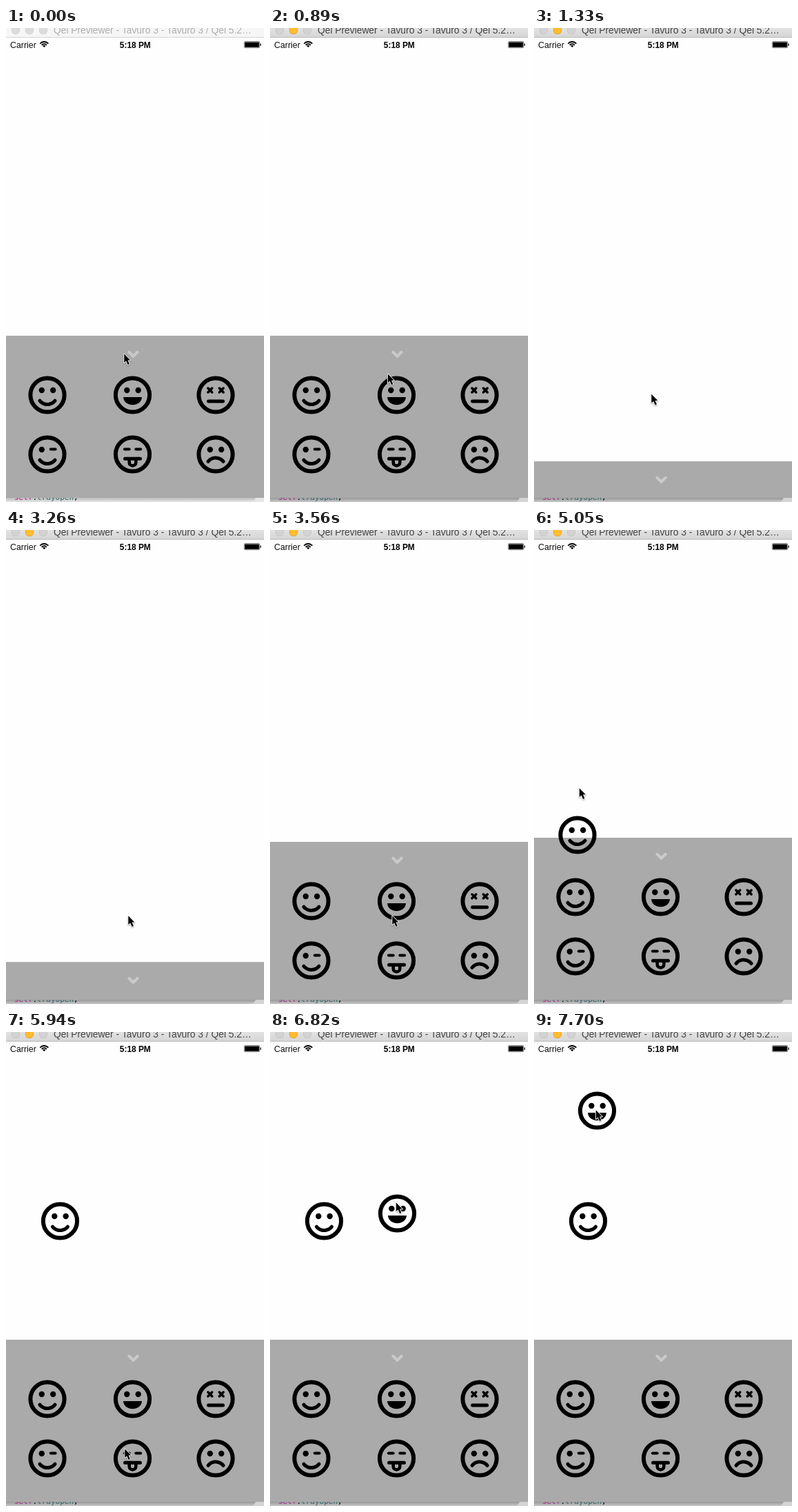
An HTML page with a canvas for the animation above (8000 ms loop, 374x687 px).

```html
<!DOCTYPE html>
<html lang="en">
<head>
<meta charset="utf-8">
<title>Face tray</title>
<style>
  html, body { margin: 0; width: 100%; height: 100%; overflow: hidden; background: #fff; }
  canvas { display: block; width: 374px; height: 687px; }
</style>
</head>
<body>
<canvas id="stage"></canvas>
<script>
const W = 374, H = 687, LOOP = 8000, STEPS = 54;
const FLOOR = 681, OPEN = 446, CLOSED = 628;
const SANS = '"Liberation Sans", Arial, sans-serif';
const canvas = document.getElementById('stage');
const ctx = canvas.getContext('2d');
const dpr = window.devicePixelRatio || 1;
canvas.width = W * dpr;
canvas.height = H * dpr;

const smooth = k => k * k * (3 - 2 * k);
const leg = (from, to, x, y) => ({ from, to, x, y });

function travel(x, y, legs, n) {
  for (const l of legs) {
    const k = smooth(Math.min(1, Math.max(0, (n - l.from) / (l.to - l.from))));
    x += (l.x - x) * k;
    y += (l.y - y) * k;
  }
  return [x, y];
}

// Damped spring from 0 to 1
function spring(s) {
  const damp = 1.6;
  return s <= 0 ? 0 : 1 - Math.exp(-damp * s) * (Math.cos(s) + damp * Math.sin(s));
}

const trayTop = n => OPEN + (CLOSED - OPEN) * (spring(n - 6.4) - spring(n - 21.92));

const pointer = [
  leg(5, 7, 170, 530.5), leg(11, 15, 177, 650), leg(20, 22, 177, 559),
  leg(27, 31, 61, 538), leg(33, 34, 65.5, 374), leg(34, 36, 79, 280),
  leg(37, 40, 172, 604), leg(40, 43, 181, 533),
  leg(44, 46, 182.5, 247), leg(46, 52, 89.5, 113)
];
const columns = [60, 183.5, 304];
const kinds = ['happy', 'excited', 'dead', 'wink', 'tongue', 'sad'];
const copies = [
  { kind: 'happy', x: columns[0], legs: [leg(33, 34, 63, 442), leg(34, 36, 78.5, 274)] },
  { kind: 'excited', x: columns[1], legs: [leg(44.5, 46, 184.5, 263), leg(46, 52, 91.5, 114)] }
];

// Drawing helpers
function rect(x, y, w, h, color) {
  ctx.fillStyle = color;
  ctx.fillRect(x, y, w, h);
}

function disc(x, y, r, color) {
  ctx.fillStyle = color;
  ctx.beginPath();
  ctx.arc(x, y, r, 0, Math.PI * 2);
  ctx.fill();
}

function arc(x, y, r, mid, half, width) {
  ctx.lineWidth = width;
  ctx.beginPath();
  ctx.arc(x, y, r, mid - half, mid + half);
  ctx.stroke();
}

function line(width, ...pts) {
  ctx.lineWidth = width;
  ctx.beginPath();
  pts.forEach(([x, y]) => ctx.lineTo(x, y));
  ctx.stroke();
}

function label(str, x, y, font, color, align = 'left') {
  ctx.font = font;
  ctx.fillStyle = color;
  ctx.textAlign = align;
  ctx.fillText(str, x, y);
}

function vertical(y0, y1, c0, c1) {
  const g = ctx.createLinearGradient(0, y0, 0, y1);
  g.addColorStop(0, c0);
  g.addColorStop(1, c1);
  return g;
}

// Face parts, around the centre of the face
const EYE_X = 8.2, EYE_Y = -7, BOW = 14.1;
const dot = side => disc(side * EYE_X, EYE_Y, 4.2, '#000');
const dash = side => line(4, [side * EYE_X - 3.4, EYE_Y - 0.4], [side * EYE_X + 3.4, EYE_Y - 0.4]);
function cross(side) {
  const x = side * EYE_X, r = 2.9;
  for (const d of [-r, r]) line(3.6, [x - r, EYE_Y - d], [x + r, EYE_Y + d]);
}
const smile = () => arc(0, 13.5 - BOW, BOW, Math.PI / 2, 0.9, 5);
const frown = () => arc(0, 5 + BOW, BOW, -Math.PI / 2, 0.9, 5);
const flat = () => line(5, [-10.5, 8.9], [10.5, 8.9]);
function laugh() {
  ctx.beginPath();
  ctx.moveTo(-13.5, 3.1);
  ctx.lineTo(13.5, 3.1);
  ctx.bezierCurveTo(12.5, 18, -12.5, 18, -13.5, 3.1);
  ctx.fill();
}
function lick() {
  line(5, [-11, 6.2], [11, 6.2]);
  ctx.lineWidth = 4.6;
  ctx.beginPath();
  ctx.moveTo(-4.8, 7);
  ctx.lineTo(-4.8, 11.5);
  ctx.bezierCurveTo(-4.8, 18, 4.8, 18, 4.8, 11.5);
  ctx.lineTo(4.8, 7);
  ctx.stroke();
}

const faces = {
  happy: [dot, dot, smile],
  excited: [dot, dot, laugh],
  dead: [cross, cross, flat],
  wink: [dot, dash, smile],
  tongue: [dash, dash, lick],
  sad: [dot, dot, frown]
};

function face(kind, x, y) {
  const [left, right, mouth] = faces[kind];
  ctx.save();
  ctx.translate(x, y);
  ctx.strokeStyle = ctx.fillStyle = '#000';
  ctx.lineCap = 'round';
  arc(0, 0, 24.6, 0, Math.PI, 6);
  left(-1);
  right(1);
  mouth();
  ctx.restore();
}

// Scene
function titleBar(active) {
  rect(0, 0, W, 13, active ? vertical(0, 13, '#e2e2e2', '#d6d6d6') : '#f6f6f6');
  rect(0, 13, W, 1, active ? '#b8b8b8' : '#d4d4d4');
  for (let i = 0; i < 3; i++) {
    const lit = active && i === 1, x = 14 + 20 * i;
    disc(x, 3, 6.3, lit ? '#e0a02c' : active ? '#c2c2c2' : '#d2d2d2');
    disc(x, 3, 5.6, lit ? '#fdbd2f' : active ? '#d3d3d3' : '#dcdcdc');
  }
  label('Qel Previewer - Tavuro 3 - Tavuro 3 / Qel 5.2…', 69, 8,
    '13.8px ' + SANS, active ? '#444' : '#aeaeae');
}

function statusBar() {
  label('Carrier', 6, 28.5, '12.4px ' + SANS, '#111');
  label('5:18 PM', 187.3, 28.5, 'bold 11.9px ' + SANS, '#000', 'center');
  ctx.strokeStyle = '#000';
  ctx.lineCap = 'butt';
  for (const r of [8, 4.8, 1.5]) arc(55.3, 28, r, -Math.PI / 2, 0.85, r > 2 ? 1.8 : 3);
  ctx.lineWidth = 0.5;
  ctx.beginPath();
  ctx.roundRect(345.3, 19.5, 22.4, 9.2, 1.5);
  ctx.stroke();
  rect(346.2, 20.5, 20.6, 7.3, '#000');
  rect(368.4, 22.5, 1.2, 3.4, '#000');
}

function codeStrip(active) {
  rect(0, FLOOR, W, H - FLOOR, active ? '#d4d4d4' : '#e6e6e6');
  ctx.fillStyle = active ? vertical(FLOOR, H, '#989898', '#c8c8c8') : vertical(FLOOR, H, '#bcbcbc', '#e6e6e6');
  ctx.beginPath();
  ctx.roundRect(0, FLOOR - 10, 362, 16, [0, 0, 8, 0]);
  ctx.fill();
  let x = 12;
  for (const [word, color] of [['self', '#b01a98'], ['.', '#000'], ['trayopen', '#35666c'], [';', '#000']]) {
    label(word, x, 684.3, '11px "DejaVu Sans Mono", monospace', color);
    x += ctx.measureText(word).width;
  }
}

function tray(top) {
  ctx.save();
  ctx.beginPath();
  ctx.rect(0, top, W, FLOOR - top);
  ctx.clip();
  rect(0, top, W, FLOOR - top, '#aaa');
  ctx.strokeStyle = '#cacaca';
  ctx.lineCap = 'butt';
  line(4, [177.2, top + 22.6], [184.5, top + 29.7], [191.8, top + 22.6]);
  kinds.forEach((kind, i) => face(kind, columns[i % 3], top + (i < 3 ? 86 : 172)));
  ctx.restore();
}

function cursor(x, y) {
  ctx.save();
  ctx.translate(x, y);
  ctx.beginPath();
  [[0.3, 0.3], [0.3, 13], [3.2, 10.4], [5.6, 16], [7.9, 15], [5.6, 9.6], [9.4, 9.6]]
    .forEach(([px, py]) => ctx.lineTo(px, py));
  ctx.closePath();
  ctx.shadowColor = 'rgba(0,0,0,.35)';
  ctx.shadowBlur = 2 * dpr;
  ctx.shadowOffsetY = dpr;
  ctx.strokeStyle = '#fff';
  ctx.lineJoin = 'round';
  ctx.lineWidth = 1.8;
  ctx.stroke();
  ctx.shadowColor = 'transparent';
  ctx.fillStyle = '#000';
  ctx.fill();
  ctx.restore();
}

function draw(t) {
  const n = Math.min(STEPS - 1, Math.floor((t + 5) * STEPS / LOOP));
  const active = t >= 450;
  ctx.setTransform(dpr, 0, 0, dpr, 0, 0);
  codeStrip(active);
  rect(0, 14, W, FLOOR - 14, '#fefefe');
  titleBar(active);
  statusBar();
  tray(trayTop(n));
  for (const { kind, x, legs } of copies) {
    if (n > legs[0].from) face(kind, ...travel(x, OPEN + 86, legs, n));
  }
  cursor(...travel(171, 472, pointer, n));
}

const start = performance.now();
function tick() {
  draw((performance.now() - start) % LOOP);
  requestAnimationFrame(tick);
}
tick();
</script>
</body>
</html>
```
